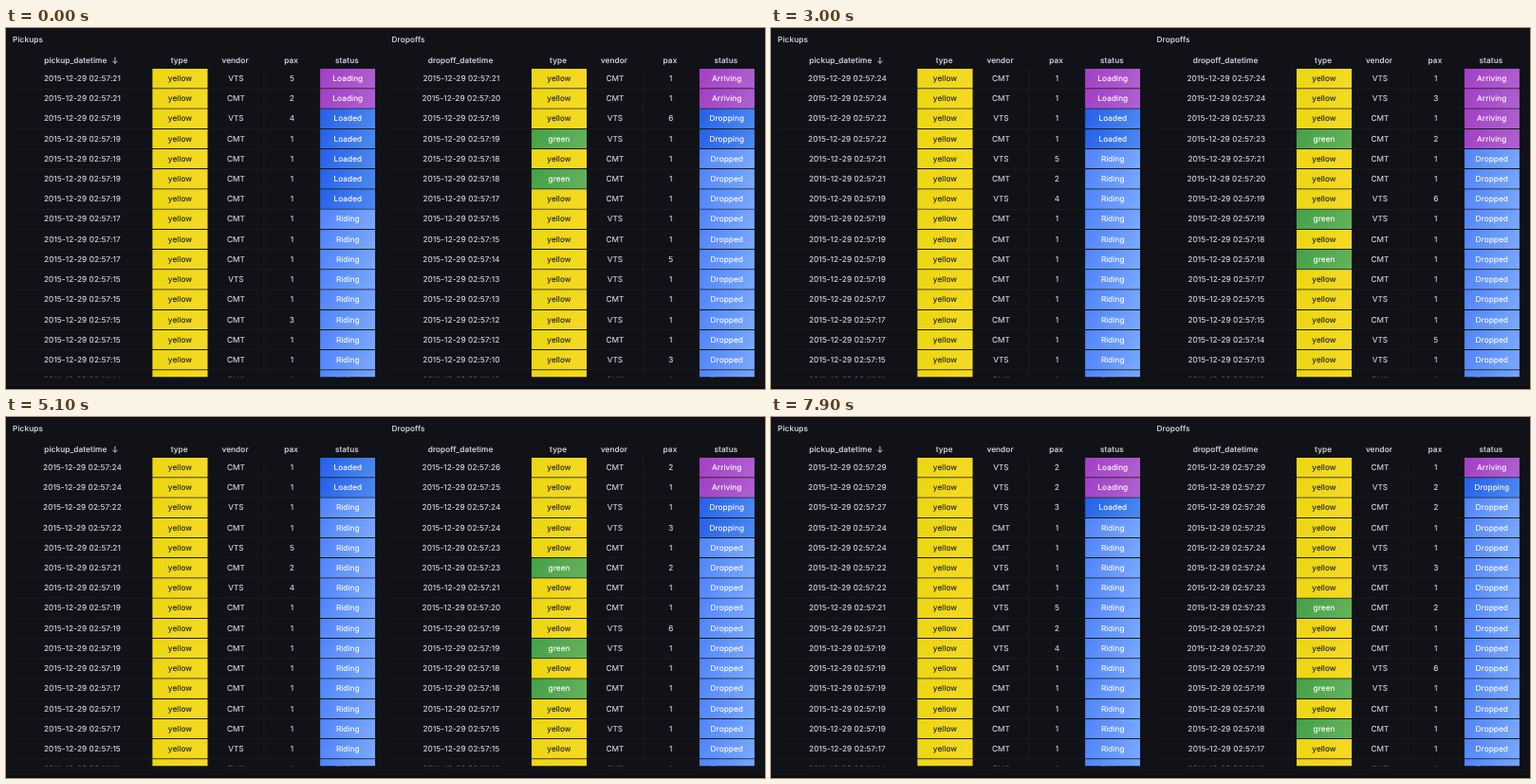
These frames come from a looping animation (800x381 px, 8000 ms). An HTML page:

```html
<!DOCTYPE html>
<html lang="en">
<head>
<meta charset="utf-8">
<title>Pickups and dropoffs</title>
<style>
  html, body { margin: 0; width: 100%; height: 100%; overflow: hidden; background: #111217; }
  body::after { content: ""; position: absolute; left: 0; right: 0; top: 378px; height: 3px; background: #0b0c10; }
  /* Laid out at full size, shown reduced */
  main {
    position: absolute; left: 0; top: 0; width: 1358px; height: 646px;
    transform: scale(.5892); transform-origin: 0 0;
    color: #d4d4e2; font: 14px/36px Inter, sans-serif; letter-spacing: .15px;
    text-rendering: geometricPrecision; -webkit-text-stroke: .2px;
  }
  section { position: absolute; top: 0; width: 650px; height: 646px; }
  h2 { position: absolute; left: 0; top: 3px; margin: 0; font: inherit; font-weight: 500; }
  .row { display: grid; grid-template: 36px / 250px repeat(4, 100px); text-align: center; }
  .head { position: absolute; left: -2px; top: 40.5px; font-weight: 500; }
  .head svg { width: 14px; height: 14px; margin-left: 7px; vertical-align: -2px; fill: none; stroke: currentColor; stroke-width: .9; }
  .body { position: absolute; top: 72.5px; width: 650px; height: 552px; overflow: hidden; }
  .body span { box-sizing: border-box; border: solid #1f2025; border-width: 0 1px 1px 0; }
  .body .fill { color: #fff; background: linear-gradient(120deg, var(--a), var(--b)) padding-box; }
  .body .yellow { --a: #ecd610; --b: #f5da26; color: #202226; }
  .green { --a: #43a047; --b: #66b35c; }
  .s0 { --a: #a23fc6; --b: #b062d0; }
  .s1 { --a: #245fea; --b: #4f8bf0; }
  .s2 { --a: #4f83fb; --b: #7caaff; }
</style>
</head>
<body>
<main></main>
<script>
const LOOP = 8000, TICK = 960, FIRST = 21, SHOWN = 16;

// Each trip: second, type, vendor, passengers; newest first
const tables = [
  {
    x: 12, title: "Pickups", column: "pickup_datetime", sorted: true,
    states: ["Loading", "Loaded", "Riding"],
    trips: "29yV2 29yV2 27yV3 24yC1 24yC1 22yV1 22yC1 21yV5 21yC2 19yV4 19yC1 19yC1 19yC1 19yC1 " +
      "17yC1 17yC1 17yC1 15yV1 15yC1 15yC3 15yC1 15yC1 14yC1"
  },
  {
    x: 690, title: "Dropoffs", column: "dropoff_datetime",
    states: ["Arriving", "Dropping", "Dropped"],
    trips: "29yC1 27yV2 26yC2 25yC1 24yV1 24yV3 23yC1 23gC2 21yC1 20yC1 19yV6 19gV1 18yC1 18gC1 " +
      "17yC1 15yV1 15yC1 14yV5 13yV1 13yC1 12yV1 12yC1 10yV3 10yC1"
  }
];
const arrow = '<svg viewBox="0 0 8 8"><path d="M4 .8V7M1.5 4.6L4 7.1 6.5 4.6"/></svg>';
const cells = list => list.map(text => `<span>${text}</span>`).join("");

for (const table of tables) {
  table.trips = table.trips.split(" ").map(s => ({
    second: +s.slice(0, 2),
    type: s[2] === "y" ? "yellow" : "green",
    vendor: s[3] === "V" ? "VTS" : "CMT",
    pax: s[4]
  }));
  const section = document.createElement("section");
  section.style.left = table.x + "px";
  const head = [table.column + (table.sorted ? arrow : ""), "type", "vendor", "pax", "status"];
  section.innerHTML = `<h2>${table.title}</h2><div class="row head">${cells(head)}</div><div class="body"></div>`;
  document.querySelector("main").append(section);
  table.body = section.lastChild;
}

function rowHtml(trip, clock, states) {
  const stage = Math.min(2, Math.max(0, clock - trip.second - 1));
  return `<div class="row">
    <span>2015-12-29 02:57:${trip.second}</span><span class="fill ${trip.type}">${trip.type}</span>
    <span>${trip.vendor}</span><span>${trip.pax}</span>
    <span class="fill s${stage}">${states[stage]}</span></div>`;
}

let shownClock;
function frame(now) {
  const clock = FIRST + Math.floor(now % LOOP / TICK);
  if (clock !== shownClock) {
    shownClock = clock;
    for (const { body, trips, states } of tables)
      body.innerHTML = trips.filter(trip => trip.second <= clock).slice(0, SHOWN)
        .map(trip => rowHtml(trip, clock, states)).join("");
  }
  requestAnimationFrame(frame);
}
frame(performance.now());
</script>
</body>
</html>
```
